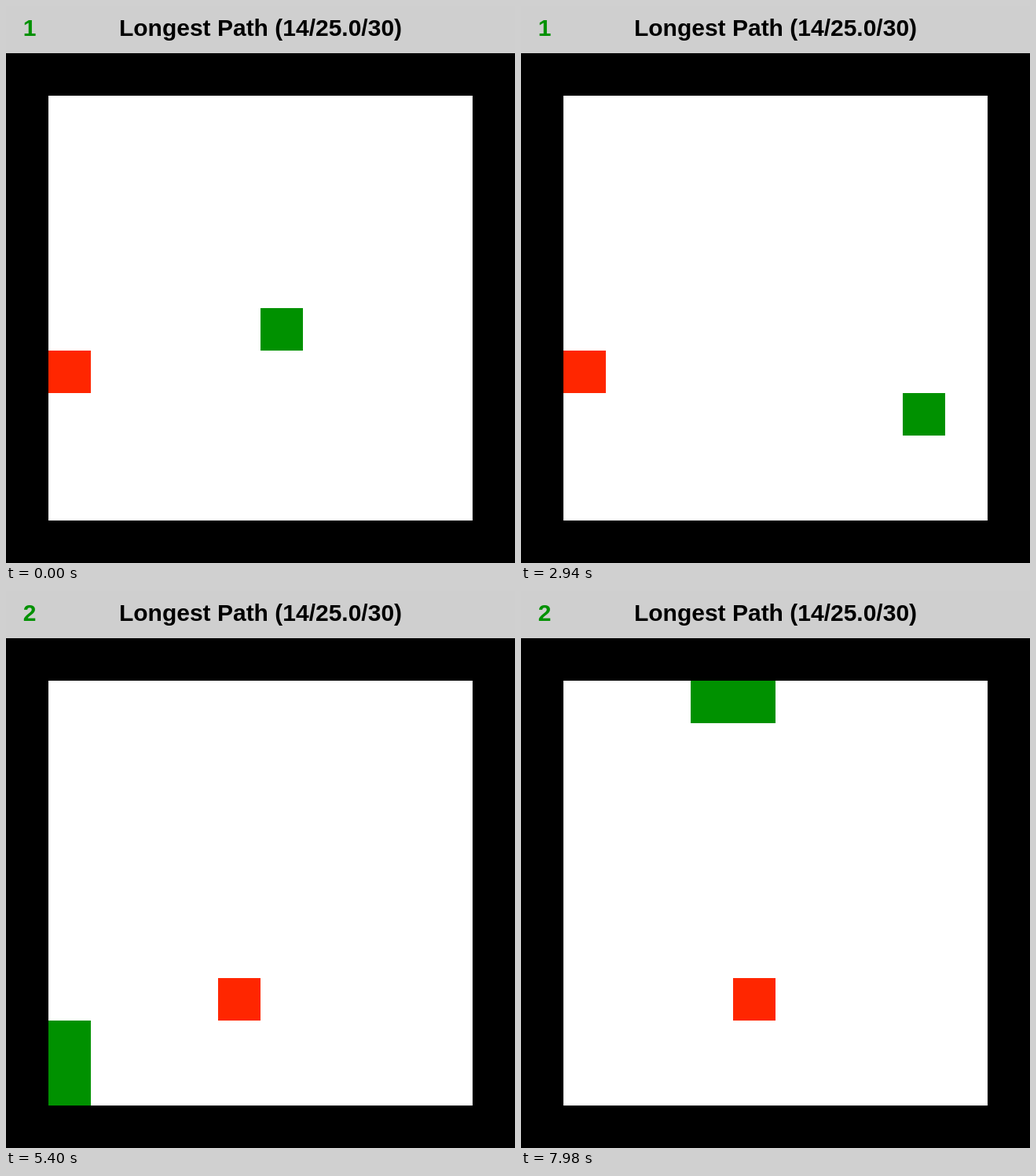
Recreate the animation shown at these times as an HTML page. Size 648 by 708 pixels, loop 8 s.

```html
<!DOCTYPE html>
<html lang="en">
<head>
<meta charset="utf-8">
<title>Longest Path</title>
<style>
  html, body { margin: 0; width: 100%; height: 100%; overflow: hidden; background: #000; }
  svg { display: block; width: 648px; height: 708px; }
  text { font: bold 30px "Liberation Sans", Arial, sans-serif; text-anchor: middle; }
  .snake { fill: #009100; }
  #food { fill: #ff2600; }
</style>
</head>
<body>
<svg viewBox="0 0 648 708">
  <rect width="648" height="708"/>
  <rect width="648" height="60" fill="#cfcfcf"/>
  <text id="score" class="snake" x="30" y="38">1</text>
  <text x="324" y="38">Longest Path (14/25.0/30)</text>
  <rect x="54" y="114" width="540" height="540" fill="#fff"/>
  <g shape-rendering="crispEdges">
    <rect id="food" width="54" height="54"/>
    <rect id="tail" class="snake" width="54" height="54"/>
    <rect id="head" class="snake" width="54" height="54"/>
  </g>
</svg>
<script>
const CELL = 54, LOOP = 8000, TICK = 60;
const ROUTE = 'U3 R2 D1 L1 D1 R1 D1 L1 D1 R1 D1 L2 U1 L2 D2 R5 U7 L8 D8 R9 U9 L6';
const DIRS = { U: [0, -1], D: [0, 1], L: [-1, 0], R: [1, 0] };
const FOODS = [[0, 6], [4, 7]];
// [move, ms]: the game speed drifts slightly between these points
const PACE = [[0, 12], [16, 1740], [25, 2760], [27, 2940], [37, 4050],
              [49, 5380], [57, 6220], [64, 7020], [73, 7980]];

const $ = id => document.getElementById(id);
const score = $('score'), food = $('food'), head = $('head'), tail = $('tail');

const cells = [[5, 5]];
for (const run of ROUTE.split(' ')) {
  const [dx, dy] = DIRS[run[0]];
  for (let i = 0; i < +run[1]; i++) {
    const [x, y] = cells[cells.length - 1];
    cells.push([x + dx, y + dy]);
  }
}

function moveTime(n) {
  const i = Math.max(1, PACE.findIndex(p => p[0] >= n));
  const [n0, t0] = PACE[i - 1], [n1, t1] = PACE[i];
  const t = t0 + (t1 - t0) * (n - n0) / (n1 - n0);
  return Math.round(t / TICK) * TICK;
}
const times = cells.map((_, n) => moveTime(n));
const eaten = cells.findIndex(([x, y]) => x === FOODS[0][0] && y === FOODS[0][1]);

function place(el, [x, y]) {
  el.setAttribute('x', CELL + x * CELL);
  el.setAttribute('y', 114 + y * CELL);
}

function draw(t) {
  let n = 0;
  while (n + 1 < times.length && times[n + 1] <= t) n++;
  const grown = n >= eaten ? 1 : 0;
  place(head, cells[n]);
  place(tail, cells[n - grown]);
  place(food, FOODS[grown]);
  score.textContent = 1 + grown;
}

const start = performance.now();
function frame() {
  draw((performance.now() - start) % LOOP);
  requestAnimationFrame(frame);
}
frame();
</script>
</body>
</html>
```
